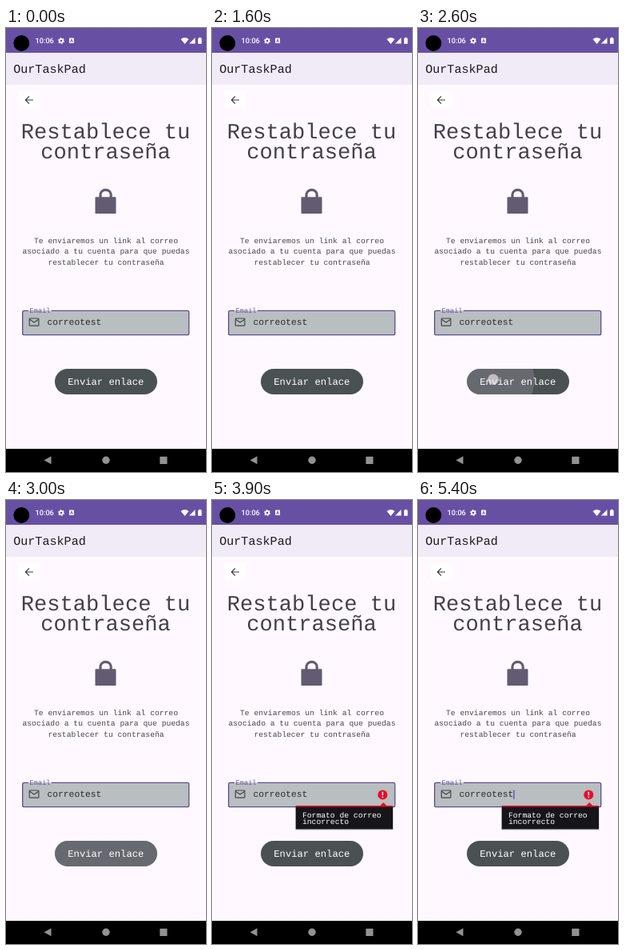
Recreate the animation shown at these times as an HTML page. Size 250 by 555 pixels, loop 5500 ms.

```html
<!DOCTYPE html>
<html lang="es">
<head>
<meta charset="utf-8">
<title>Restablecer contraseña</title>
<style>
  html, body { margin: 0; width: 100%; height: 100%; overflow: hidden; background: #fff9ff; }
  svg { display: block; width: 100%; height: 100%; }
  text { font-family: "Liberation Mono", monospace; text-rendering: geometricPrecision; }
  .mid { text-anchor: middle; }
  .title { font-size: 27.1px; fill: #453f4d; }
  .body { font-size: 9.69px; fill: #49454f; }
  .tip { font-size: 9.69px; fill: #fff; }

  .caret, .ripple, .touch, .error, .popup {
    opacity: 0;
    animation: 5.5s step-end infinite;
  }
  .caret { animation-name: blink; }
  .touch { animation-name: touch; }
  .error { animation-name: error; }
  .ripple { animation-name: ripple; animation-timing-function: linear; }
  .popup { animation-name: popup; animation-timing-function: linear; transform-origin: 165px 397px; }

  @keyframes blink {
    0%, 10.9%, 29.08%, 47.26%, 65.44%, 83.62% { opacity: 0; }
    1.81%, 19.99%, 38.17%, 56.35%, 74.53%, 92.71% { opacity: 1; }
  }
  @keyframes touch {
    0%, 49.08% { opacity: 0; }
    47.26% { opacity: .65; }
  }
  @keyframes error {
    0% { opacity: 0; }
    58.17% { opacity: 1; }
  }
  @keyframes ripple {
    0%, 47.25% { opacity: 0; transform: translate(94px, 440px) scale(51); }
    47.26% { opacity: .17; transform: translate(94px, 440px) scale(51); }
    51%, 56.34% { opacity: .17; transform: translate(125px, 442px) scale(80); }
    56.35%, 100% { opacity: 0; transform: translate(125px, 442px) scale(80); }
  }
  @keyframes popup {
    0%, 58.16% { opacity: 0; transform: scale(.97); }
    58.17% { opacity: .5; transform: scale(.97); }
    60% { opacity: .9; transform: scale(.988); }
    61.8%, 100% { opacity: 1; transform: none; }
  }
</style>
</head>
<body>
<svg viewBox="0 0 250 555" preserveAspectRatio="none">
  <defs>
    <clipPath id="pill"><rect x="61" y="426" width="128" height="32" rx="16"/></clipPath>
  </defs>
  <rect width="250" height="555" fill="#fff9ff"/>

  <!-- Status bar -->
  <rect width="250" height="31" fill="#6750a4"/>
  <circle cx="19.3" cy="19" r="10"/>
  <text x="36.5" y="19.3" fill="#fff" style="font: 500 9.2px Roboto, sans-serif">10:06</text>
  <circle cx="69" cy="16" r="2.2" fill="none" stroke="#fff" stroke-width="1.7"/>
  <circle cx="69" cy="16" r="3.4" fill="none" stroke="#fff" stroke-width="1.2" stroke-dasharray="1.78"/>
  <rect x="79" y="12.5" width="6" height="6.5" rx=".8" fill="#fff"/>
  <path d="M80.4 17.8 82 13.8l1.6 4M81 16.6h2" fill="none" stroke="#6750a4" stroke-width=".8"/>
  <g fill="#fff">
    <path d="M218.5 14Q223.5 9.8 228.5 14L223.5 20Z"/>
    <path d="M229 19.5 236.5 12V19.5Z"/>
    <path d="M240 12.7h1.2v-1h2.2v1h1.2v7H240Z"/>
  </g>

  <!-- App bar -->
  <rect y="31" width="250" height="40" fill="#f1eaf7"/>
  <text x="9.2" y="55.5" font-size="15.1" fill="#1d1b20">OurTaskPad</text>
  <rect x="16" y="79" width="26" height="21" fill="#fff"/>
  <path d="M34 90H24.7M29 85.4 24.4 90 29 94.6" fill="none" stroke="#3b383e" stroke-width="1.2"/>

  <!-- Heading -->
  <g class="mid title">
    <text x="124.5" y="138">Restablece tu</text>
    <text x="124.5" y="162.5">contraseña</text>
  </g>
  <path d="M118 213V208.3a6.6 5.9 0 0 1 13.2 0V213" fill="none" stroke="#625b71" stroke-width="3.2"/>
  <rect x="111.5" y="211.3" width="26" height="20.7" rx=".8" fill="#625b71"/>
  <g class="mid body">
    <text x="125" y="268.8">Te enviaremos un link al correo</text>
    <text x="125" y="282.3">asociado a tu cuenta para que puedas</text>
    <text x="125" y="295.8">restablecer tu contraseña</text>
  </g>

  <!-- Email field -->
  <rect x="20.7" y="353.3" width="208" height="30.4" rx="2" fill="#b9bec0"/>
  <path d="M28 353.3H22.7a2 2 0 0 0-2 2V381.7a2 2 0 0 0 2 2H226.7a2 2 0 0 0 2-2V355.3a2 2 0 0 0-2-2H57"
        fill="none" stroke="#5c4c94" stroke-width="1.3"/>
  <text x="29.5" y="356" font-size="8.7" fill="#6750a4">Email</text>
  <g fill="none" stroke="#45434a" stroke-width="1.2">
    <rect x="29.3" y="363" width="11.6" height="9.2" rx=".8"/>
    <path d="M29.6 364.2 35.1 368 40.6 364.2"/>
  </g>
  <text x="51.5" y="371.3" font-size="11.3" fill="#2a282d">correotest</text>
  <rect class="caret" x="119.2" y="362.5" width="1.4" height="11.5" fill="#6750c4"/>
  <g class="error">
    <circle cx="213.3" cy="368.5" r="6" fill="#ec0928"/>
    <path d="M213.3 364.8V369.3M213.3 370.7V372.2" stroke="#fff" stroke-width="1.5"/>
  </g>

  <!-- Button -->
  <rect x="61" y="426" width="128" height="32" rx="16" fill="#4a5153"/>
  <g clip-path="url(#pill)">
    <circle class="ripple" r="1" fill="#f4e2f8"/>
  </g>
  <text class="mid" x="124.8" y="445.5" font-size="12.2" fill="#fff">Enviar enlace</text>
  <circle class="touch" cx="94" cy="439.3" r="6.8" fill="#f0eaf0"/>

  <!-- Error popup -->
  <g class="popup">
    <rect x="104" y="384" width="123" height="29" rx="1" fill="#000" opacity=".13"/>
    <rect x="104.7" y="382.5" width="121.3" height="29" fill="#16151a"/>
    <path d="M104.7 382H210.2L214.2 378 218.2 382H226V383.4H104.7Z" fill="#ec0928"/>
    <g class="tip">
      <text x="113" y="396.8">Formato de correo</text>
      <text x="113" y="405.2">incorrecto</text>
    </g>
  </g>

  <!-- Navigation bar -->
  <rect y="526" width="250" height="29"/>
  <g fill="#929292">
    <path d="M47.5 540.3 56.5 535.3V545.3Z"/>
    <circle cx="125" cy="540.3" r="4.7"/>
    <rect x="192.3" y="535.8" width="9.2" height="9.2" rx=".6"/>
  </g>
</svg>
</body>
</html>
```
